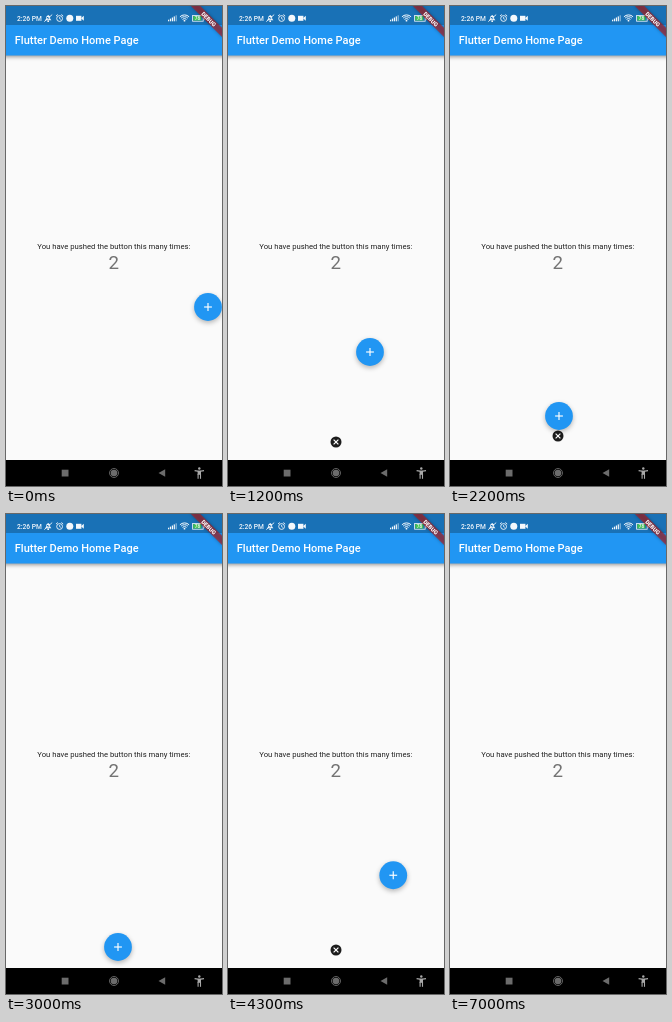
Recreate the animation shown at these times as an HTML page with a canvas. Size 216 by 480 pixels, loop 7.9 s.

```html
<!DOCTYPE html>
<html lang="en">
<head>
<meta charset="utf-8">
<title>Draggable button</title>
<style>
  html, body { margin: 0; width: 100%; height: 100%; overflow: hidden; background: #fafafa; }
  canvas { display: block; width: 216px; height: 480px; }
</style>
</head>
<body>
<canvas id="stage" width="216" height="480"></canvas>
<script>
const ctx = document.getElementById('stage').getContext('2d');
const LOOP = 7900, STEP = 100, GONE = 4700;
const BLUE = '#2196f3', STATUS = '#1971b6';

// Drag path of the button: time, x, y
const path = [
  [700, 202, 301], [1200, 142, 346], [2200, 109, 410], [2500, 108, 433],
  [3000, 112, 433], [3150, 117, 422], [3700, 195, 321], [3900, 202, 317],
  [4000, 202, 317], [4600, 104, 435]
];

const clamp = (v, lo, hi) => Math.min(hi, Math.max(lo, v));

// Monotone cubic interpolation of one coordinate
function along(t, axis) {
  const last = path.length - 1;
  if (t <= path[0][0]) return path[0][axis];
  if (t >= path[last][0]) return path[last][axis];
  const i = path.findIndex(p => p[0] > t) - 1;
  const slope = k => (path[k + 1][axis] - path[k][axis]) / (path[k + 1][0] - path[k][0]);
  const tangent = k => {
    if (k === 0) return slope(0);
    if (k === last) return slope(last - 1);
    const a = slope(k - 1), b = slope(k);
    return a * b > 0 ? 2 * a * b / (a + b) : 0;
  };
  const span = path[i + 1][0] - path[i][0], u = (t - path[i][0]) / span;
  const h = u * u * (3 - 2 * u);
  return path[i][axis] * (1 - h) + path[i + 1][axis] * h
    + span * (u * (1 - u) * (1 - u) * tangent(i) - u * u * (1 - u) * tangent(i + 1));
}

function rect(x, y, w, h, color) {
  ctx.fillStyle = color;
  ctx.fillRect(x, y, w, h);
}

function disc(x, y, r, color) {
  ctx.fillStyle = color;
  ctx.beginPath();
  ctx.arc(x, y, r, 0, 7);
  ctx.fill();
}

function poly(color, ...points) {
  ctx.fillStyle = color;
  ctx.beginPath();
  points.forEach(([x, y]) => ctx.lineTo(x, y));
  ctx.fill();
}

function line(color, width, ...points) {
  ctx.strokeStyle = color;
  ctx.lineWidth = width;
  ctx.beginPath();
  points.forEach(([x, y]) => ctx.lineTo(x, y));
  ctx.stroke();
}

function ring(x, y, r, color, width) {
  ctx.strokeStyle = color;
  ctx.lineWidth = width;
  ctx.beginPath();
  ctx.arc(x, y, r, 0, 7);
  ctx.stroke();
}

function text(str, x, y, size, color, weight = 400, align = 'left') {
  ctx.font = `${weight} ${size}px Roboto, sans-serif`;
  ctx.textAlign = align;
  ctx.fillStyle = color;
  ctx.fillText(str, x, y);
}

function shadowed(color, blur, dy, draw) {
  ctx.save();
  ctx.shadowColor = color;
  ctx.shadowBlur = blur;
  ctx.shadowOffsetY = dy;
  draw();
  ctx.restore();
}

function statusBar() {
  const white = '#f4f8fc';
  rect(0, 0, 216, 19, STATUS);
  text('2:26 PM', 11, 14.6, 6.7, white, 500);

  // Muted bell
  poly(white, [39, 14.3], [40.2, 12.8], [40.4, 10.6], [42.2, 9], [44, 10.6], [44.2, 12.8], [45.4, 14.3]);
  disc(42.2, 15.2, 0.9, white);
  rect(41, 11, 2.2, 2.2, STATUS);
  line(white, 0.9, [38.3, 15.6], [46.2, 8.6]);

  // Alarm clock
  ring(53.6, 12.5, 2.9, white, 0.9);
  line(white, 0.8, [53.6, 10.9], [53.6, 12.7], [54.9, 13.3]);
  line(white, 0.9, [50, 10], [51.8, 8.5]);
  line(white, 0.9, [55.4, 8.5], [57.2, 10]);

  disc(63.8, 12.2, 3.5, white);

  // Video camera
  rect(70, 9.8, 5.4, 5, white);
  poly(white, [75, 12.2], [77.8, 9.8], [77.8, 14.8]);

  // Signal, wifi, battery
  for (let i = 0; i < 5; i++) {
    const h = 1.6 + i * 1.1;
    rect(162 + i * 1.9, 15.3 - h, 1.2, h, i < 4 ? white : '#8db8da');
  }
  ctx.lineCap = 'butt';
  for (const r of [2.8, 4.7, 6.5]) {
    ctx.strokeStyle = white;
    ctx.lineWidth = 1;
    ctx.beginPath();
    ctx.arc(178.5, 15.4, r, -Math.PI * 0.75, -Math.PI * 0.25);
    ctx.stroke();
  }
  disc(178.5, 14.7, 0.9, white);
  ctx.strokeStyle = white;
  ctx.lineWidth = 0.8;
  ctx.strokeRect(186.6, 9.4, 10.6, 5.8);
  rect(187.3, 10.1, 8, 4.4, '#45c254');
  text('78', 191.6, 14.2, 4.8, white, 500, 'center');
  rect(197.8, 11, 1, 2.6, white);
}

function banner() {
  ctx.save();
  ctx.translate(216, 0);
  ctx.rotate(Math.PI / 4);
  shadowed('rgba(0,0,0,.5)', 3.3, 0, () => rect(-22, 15.4, 44, 6.6, 'rgba(183,28,28,.63)'));
  text('DEBUG', 0, 20.7, 5.6, '#fff', 900, 'center');
  ctx.restore();
}

function navBar() {
  const grey = '#6c6c6c';
  rect(0, 454, 216, 26, '#000');
  rect(55.7, 463.7, 6.8, 6.8, grey);
  ring(108, 467, 4.5, grey, 0.9);
  disc(108, 467, 3.3, grey);
  poly(grey, [152.5, 467], [159.2, 463.3], [159.2, 470.7]);
  // Accessibility figure
  const pale = '#a9a9a9';
  disc(193.3, 462.5, 1.2, pale);
  line(pale, 1.2, [188.6, 464.6], [193.3, 465.3], [198, 464.6]);
  rect(191.6, 464.8, 3.4, 4, pale);
  line(pale, 1.1, [192.1, 468], [192.1, 472.8]);
  line(pale, 1.1, [194.5, 468], [194.5, 472.8]);
}

function closeIcon(x, y) {
  disc(x, y, 5.5, '#1c1c1c');
  const d = 2.4;
  line('#fff', 1.2, [x - d, y - d], [x + d, y + d]);
  line('#fff', 1.2, [x - d, y + d], [x + d, y - d]);
}

function button(x, y) {
  shadowed('rgba(0,0,0,.28)', 5, 2, () => disc(x, y, 13.9, BLUE));
  line('#fff', 1.15, [x - 3.9, y], [x + 3.9, y]);
  line('#fff', 1.15, [x, y - 3.9], [x, y + 3.9]);
}

function draw(t) {
  rect(0, 0, 216, 480, '#fafafa');
  shadowed('rgba(0,0,0,.4)', 4, 1.3, () => rect(-5, 0, 226, 49.5, BLUE));
  text('Flutter Demo Home Page', 8.8, 38.1, 11, '#fff', 500);
  text('You have pushed the button this many times:', 107.8, 243.4, 7.7, '#212121', 400, 'center');
  text('2', 107.8, 263, 18.7, '#737373', 400, 'center');

  if (t < GONE) {
    const x = along(t, 1), y = along(t, 2);
    // The close target rises to meet a button that comes near
    if (t >= 800) closeIcon(108, 436 - 6 * clamp((y - 385) / 25, 0, 1));
    button(x, y);
  }
  statusBar();
  banner();
  navBar();
}

const start = performance.now();
function tick() {
  const t = (performance.now() - start) % LOOP;
  draw(Math.floor(t / STEP) * STEP);
  requestAnimationFrame(tick);
}
tick();
</script>
</body>
</html>
```
